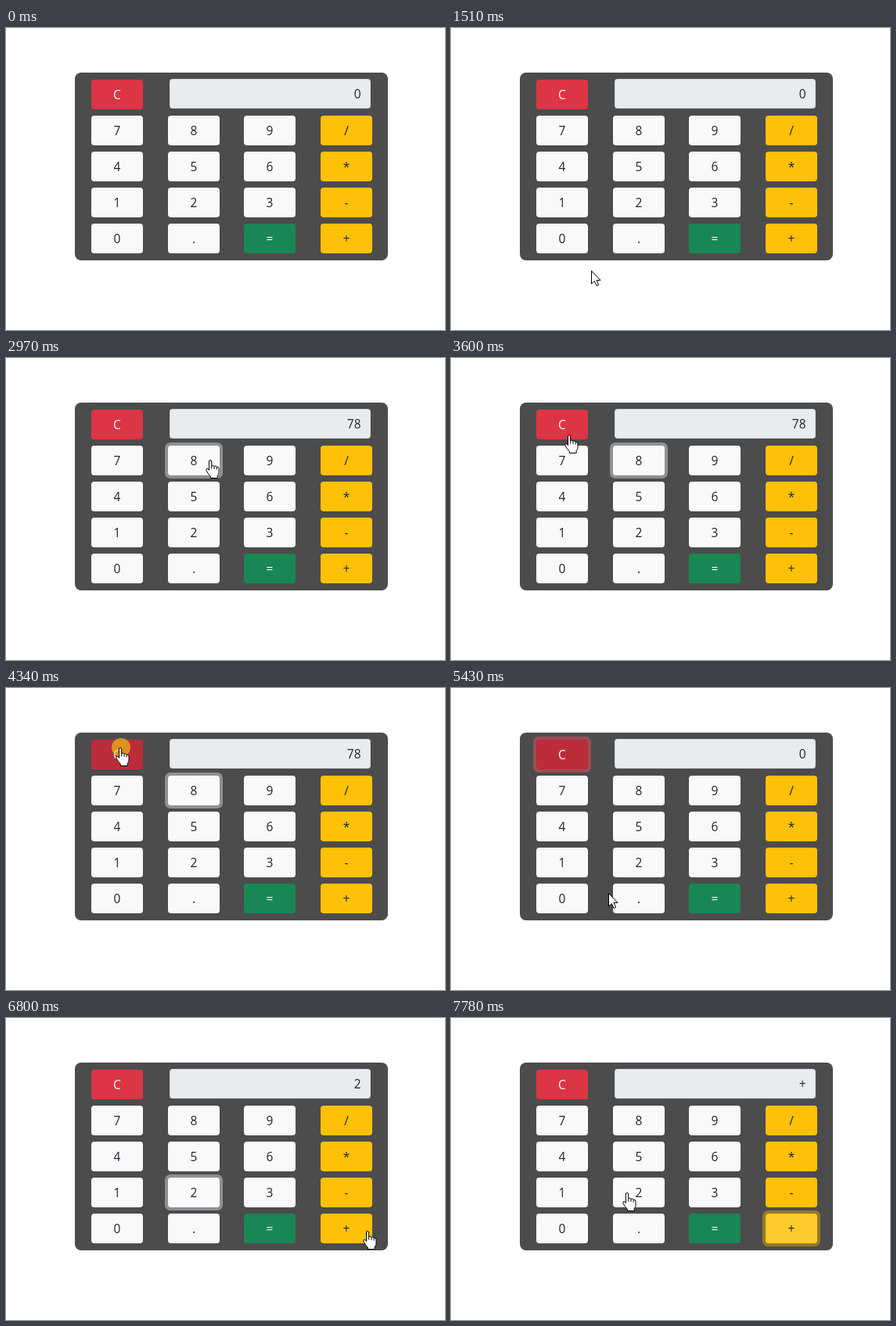
Write an HTML page with a canvas that moves like this. It is 561 px wide and 386 px high and loops after 8 s.

```html
<!DOCTYPE html>
<html lang="en">
<head>
<meta charset="utf-8">
<title>Calculator</title>
<style>
  html, body { margin: 0; width: 100%; height: 100%; overflow: hidden; background: #fff; }
  canvas { display: block; }
</style>
</head>
<body>
<canvas id="stage" width="561" height="386"></canvas>
<script>
const stage = document.getElementById('stage');
const ctx = stage.getContext('2d');
const LOOP = 8000;
const HALO = 140;        // how long a click shows before it takes effect
const HOVER_LAG = 100;
const INK = '#212529';
const W = 66, H = 38;

const THEMES = {
  light:   { base: '#f8f9fa', hover: '#f9fafb', text: INK, ring: 'rgba(211,212,213,.5)' },
  warning: { base: '#ffc107', hover: '#ffca2c', text: INK, ring: 'rgba(217,164,6,.5)' },
  danger:  { base: '#dc3545', hover: '#bb2d3b', text: '#fff', ring: 'rgba(225,83,97,.5)' },
  success: { base: '#198754', hover: '#157347', text: '#fff', ring: 'rgba(60,153,110,.5)' }
};

const themeOf = c => c === 'C' ? 'danger' : c === '=' ? 'success' : '/*-+'.includes(c) ? 'warning' : 'light';

const buttons = ['C', '789/', '456*', '123-', '0.=+'].flatMap((row, r) =>
  [...row].map((label, c) => ({
    label, x: Math.round(109 + c * 293 / 3), y: 66 + r * 46, theme: THEMES[themeOf(label)]
  })));

const presses = [
  { at: 2200, label: '7' },
  { at: 2830, label: '8' },
  { at: 4340, label: 'C' },
  { at: 6180, label: '2' },
  { at: 7080, label: '+' }
];

// Each move starts where the one before it ended; via bends the way.
const ENTER = { at: 120, to: [146, 385] };
const moves = [
  { from: 380, until: 450, to: [146, 380] },
  { from: 1330, until: 2000, to: [150, 129], via: [230, 250] },
  { from: 2410, until: 2760, to: [262, 130] },
  { from: 3250, until: 3810, to: [147, 76], via: [123, 107] },
  { from: 5010, until: 5430, to: [200, 262], via: [160, 170] },
  { from: 5430, until: 5850, to: [264, 214], via: [322, 302] },
  { from: 6390, until: 6660, to: [476, 271] },
  { from: 6660, until: 6800, to: [463, 272] },
  { from: 7220, until: 7780, to: [226, 223], via: [350, 262] }
];

function pointerAt(t) {
  if (t < ENTER.at) return null;
  let pos = ENTER.to;
  for (const { from, until, to, via } of moves) {
    if (t < from) break;
    const k = Math.min(1, (t - from) / (until - from));
    pos = pos.map((a, i) => {
      const bend = via ? via[i] : (a + to[i]) / 2;
      return a * (1 - k) ** 2 + 2 * bend * k * (1 - k) + to[i] * k * k;
    });
  }
  return pos;
}

function buttonAt(p) {
  return p && buttons.find(b => p[0] >= b.x && p[0] < b.x + W && p[1] >= b.y && p[1] < b.y + H);
}

function enter(shown, label) {
  if (label === 'C') return '0';
  return label === '+' || shown === '0' ? label : shown + label;
}

function box(x, y, w, h, r, fill) {
  ctx.fillStyle = fill;
  ctx.beginPath();
  ctx.roundRect(x, y, w, h, r);
  ctx.fill();
}

function text(str, x, y, color, align) {
  ctx.font = '15.5px "Open Sans", "Noto Sans", sans-serif';
  ctx.textAlign = align;
  ctx.fillStyle = color;
  ctx.fillText(str, x, y);
}

const arrow = new Path2D('M.5 .5V17L4.3 13.5L7 19.5L9.6 18.4L7 12.4H12Z');
const hand = new Path2D('M-2.5 2Q-2.5 .5 -1 .5Q.7 .5 .7 2V7.5Q2.8 6.6 4 8.3Q6 7.4 7.2 9.2' +
  'Q10 8.6 10 11.5V16.5Q10 18.5 8.2 20.5V23.5H-.5V21.5Q-3.5 18.5 -6 14Q-6.8 11.8 -5 11.2Q-3.8 11.2 -2.5 13.5Z');
const knuckles = new Path2D('M.7 7.5V11.5M4 8.5V12M7.2 9.5V12.5');

function drawPointer([x, y], overButton) {
  const shape = overButton ? hand : arrow;
  ctx.save();
  ctx.translate(Math.round(x), Math.round(y));
  ctx.fillStyle = '#fff';
  ctx.strokeStyle = '#000';
  ctx.lineWidth = 1;
  ctx.lineJoin = 'round';
  ctx.fill(shape);
  ctx.stroke(shape);
  if (overButton) ctx.stroke(knuckles);
  ctx.restore();
}

function drawButton({ label, x, y, theme }, focused, hovered) {
  if (focused) box(x - 4, y - 4, W + 8, H + 8, 7, theme.ring);
  box(x, y, W, H, 4, focused || hovered ? theme.hover : theme.base);
  text(label, x + W / 2, y + 25, theme.text, 'center');
}

function draw(t) {
  const pointer = pointerAt(t);
  const hovered = buttonAt(pointerAt(t - HOVER_LAG));
  const done = presses.filter(p => t >= p.at + HALO).map(p => p.label);

  ctx.fillStyle = '#fff';
  ctx.fillRect(0, 0, stage.width, stage.height);
  box(88, 57, 400, 240, 8, '#4c4c4c');
  box(209, 65, 257, 38, 4, '#ced4da');
  box(210, 66, 255, 36, 3, '#e9ecef');
  text(done.reduce(enter, '0'), 453.5, 90, INK, 'right');
  for (const b of buttons) drawButton(b, b.label === done[done.length - 1], b === hovered);

  if (!pointer) return;
  if (presses.some(p => t >= p.at && t < p.at + HALO)) {
    ctx.fillStyle = 'rgba(245,213,15,.6)';
    ctx.beginPath();
    ctx.arc(...pointer, 12, 0, Math.PI * 2);
    ctx.fill();
  }
  drawPointer(pointer, buttonAt(pointer));
}

function tick() {
  draw(performance.now() % LOOP);
  requestAnimationFrame(tick);
}
tick();
</script>
</body>
</html>
```
